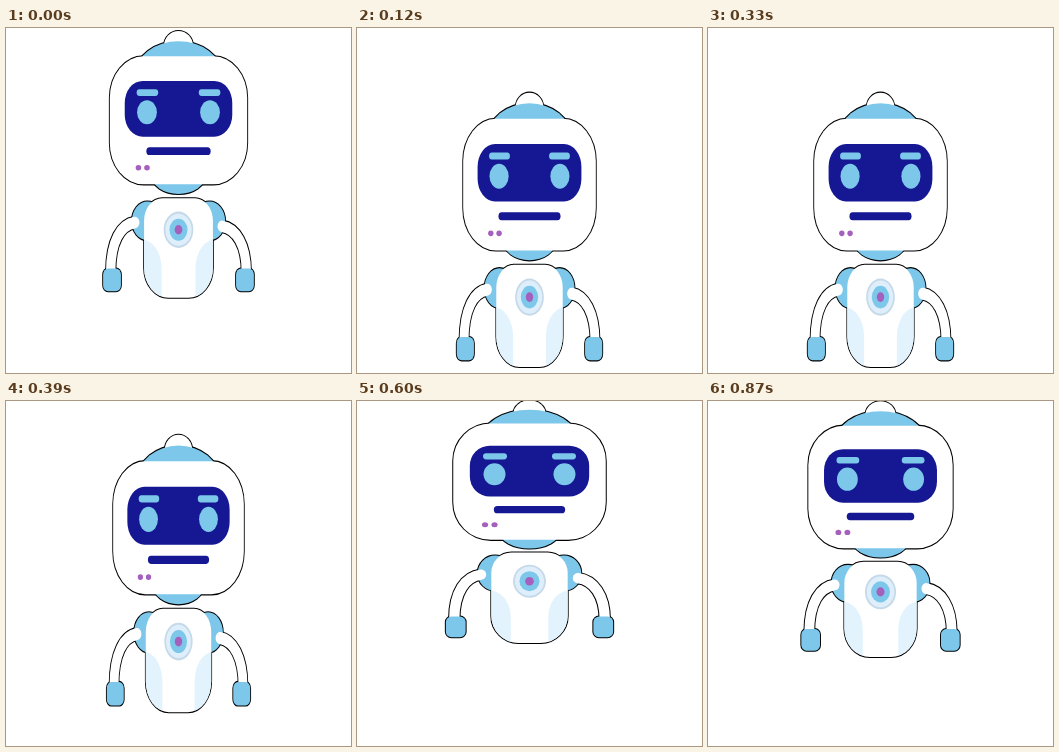
An HTML page with a canvas that plays this animation: 345x345 px, repeating every 0.9 s.

```html
<!DOCTYPE html>
<html lang="en">
<head>
<meta charset="utf-8">
<title>Bouncing robot</title>
<style>
  html, body { margin: 0; width: 100%; height: 100%; overflow: hidden; background: #fff; }
  canvas { display: block; }
</style>
</head>
<body>
<canvas id="stage" width="345" height="345"></canvas>
<script>
const ctx = document.getElementById("stage").getContext("2d");

const STEP = 30, STEPS = 30, LOWEST = 7.5;
const CENTER = 172.5, FOOT = 242;
const WHITE = "#ffffff", CYAN = "#7cc7ea", NAVY = "#151793";
const PALE = "#e2f3fe", PURPLE = "#a55fbc", INK = "#000000";
const OUTLINE = 2, ARM = 10.4;

// All shapes use x = 0 as the robot's vertical axis.
function ellipse(x, y, rx, ry = rx) {
  const path = new Path2D();
  path.ellipse(x, y, rx, ry, 0, 0, Math.PI * 2);
  return path;
}

function box(x, y, w, h, radii) {
  const path = new Path2D();
  path.roundRect(x, y, w, h, radii);
  return path;
}

// The right arm is attached a little lower than the left one.
function arm(side) {
  const top = side < 0 ? 173 : 176.5;
  const path = new Path2D();
  path.moveTo(side * 48.5, top);
  path.bezierCurveTo(side * 64, top + 2, side * 75.3, top + 17, side * 75.3, 218);
  return path;
}

function sidePanel(side) {
  const path = new Path2D();
  path.moveTo(side * 40, 188.5);
  path.bezierCurveTo(side * 27, 190, side * 18.8, 201, side * 18.8, 216);
  path.lineTo(side * 18.8, 244);
  path.lineTo(side * 40, 244);
  path.closePath();
  return path;
}

const bothSides = make => [make(-1), make(1)];
const body = box(-38.2, 151, 76.4, 90.4, [20, 20, 27, 27]);

// Silhouette parts from back to front.
const parts = [
  ...bothSides(s => ({ path: ellipse(s * 34.5, 171.6, 17.3, 17.6), color: CYAN })),
  { path: body, color: WHITE },
  ...bothSides(s => ({ path: arm(s), color: WHITE, line: ARM })),
  ...bothSides(s => ({ path: box(s * 73.8 - 9.9, 214.9, 19.8, 20.6, 5.5), color: CYAN })),
  { path: ellipse(0, 12, 16, 13.2), color: WHITE },
  { path: ellipse(0, 38, 48, 29.8), color: CYAN },
  { path: ellipse(0, 130, 30.2, 17), color: CYAN },
  { path: box(-76.3, 21.9, 152.6, 116.4, 37.5), color: WHITE }
];

const panels = bothSides(sidePanel);

const details = [
  [box(-59.7, 44.2, 119.4, 50.8, 20), NAVY],
  ...bothSides(s => [ellipse(s * 35, 72.7, 11), CYAN]),
  ...bothSides(s => [box(s * 34.5 - 12, 51.7, 24, 6.2, 3.1), CYAN]),
  [box(-35.7, 104.5, 71.4, 7.2, 3.6), NAVY],
  [ellipse(-44.5, 123.2, 3.1, 2.5), PURPLE],
  [ellipse(-35, 123.2, 3.1, 2.5), PURPLE],
  [ellipse(0, 179.6, 16.5), "#c5d9e9"],
  [ellipse(0, 179.6, 14.6), "#deeffb"],
  [ellipse(0, 179.6, 10), CYAN],
  [ellipse(0, 179.6, 4.3), PURPLE]
];

const falloff = (u, middle, rate) => 1 / (1 + Math.exp(rate * (u - middle)));

// Steps away from the lowest point, the same going down and coming up.
function pose(time) {
  const step = Math.floor(time / STEP) % STEPS;
  const away = Math.abs(step - LOWEST);
  const u = Math.min(away, STEPS - away);
  const stretch = 0.15 * falloff(u, 8.04, 1.25);
  const squash = 0.3 * falloff(u, 2, 1.8);
  return { scale: 1 + stretch - squash, drop: 108 * falloff(u, 6.24, 0.82) };
}

function fill(path, color) {
  ctx.fillStyle = color;
  ctx.fill(path);
}

function stroke(path, color, width) {
  ctx.strokeStyle = color;
  ctx.lineWidth = width;
  ctx.stroke(path);
}

function draw(time) {
  const { scale, drop } = pose(time);
  ctx.setTransform(1, 0, 0, 1, 0, 0);
  fill(box(0, 0, 345, 345, 0), WHITE);
  ctx.setTransform(2 - scale, 0, 0, scale, CENTER, drop + FOOT * (1 - scale));
  ctx.lineCap = "round";

  for (const { path, line = 0 } of parts) stroke(path, INK, line + OUTLINE);
  for (const { path, color, line } of parts) {
    if (line) stroke(path, color, line);
    else fill(path, color);
    if (path === body) {
      ctx.save();
      ctx.clip(body);
      for (const panel of panels) fill(panel, PALE);
      ctx.restore();
    }
  }
  for (const [path, color] of details) fill(path, color);
}

const start = performance.now();
function tick() {
  draw(performance.now() - start);
  requestAnimationFrame(tick);
}
tick();
</script>
</body>
</html>
```
